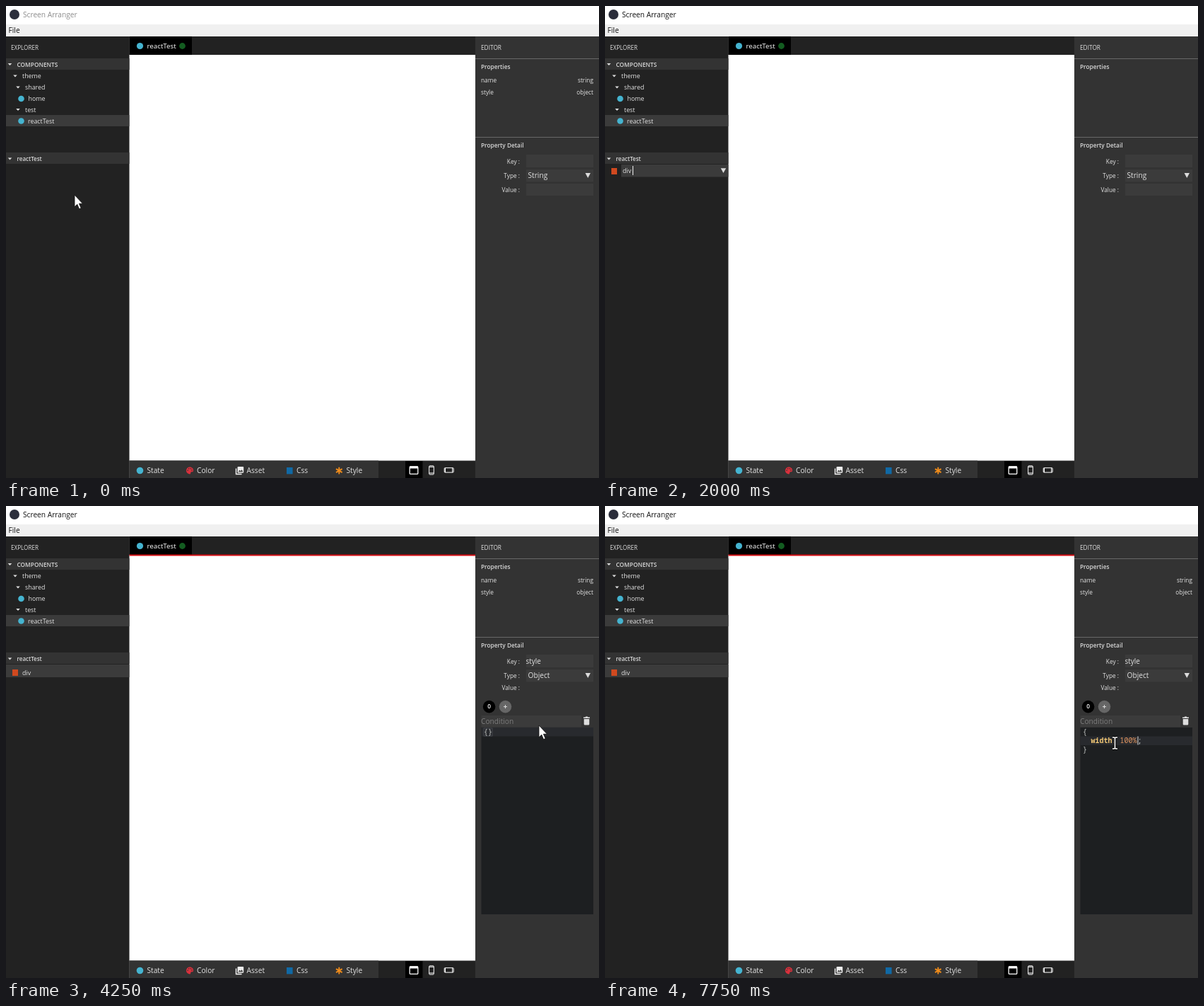
Write an HTML page that moves like this. It is 839 by 667 pixels and loops after 8 s.

```html
<!DOCTYPE html>
<html lang="en">
<head>
<meta charset="utf-8">
<title>Component editor</title>
<style>
  html, body { margin: 0; width: 100%; height: 100%; overflow: hidden; background: #fff; }
  svg { display: block; width: 100%; height: 100%; }
  text { font: 8.9px "Open Sans", "Noto Sans", sans-serif; fill: #e2e2e2; white-space: pre; }
  .big { font-size: 10.2px; }
  .small { font-size: 8.3px; }
  .head { font-size: 8.3px; font-weight: 600; fill: #d8d8d8; }
  .end { text-anchor: end; }
  .mid { text-anchor: middle; }
  .dark { fill: #111; }
  .code { font: 10px "Noto Sans Mono", "DejaVu Sans Mono", monospace; fill: #c5c8c6; }
  .key { font-weight: 600; fill: #f0c674; }
  .num { fill: #de935f; }
  .bar { fill: #333; }
  .field { fill: #3b3b3b; }
  .rule { fill: #686868; }
  .atom { fill: #45b4d0; }
  .markup { fill: #d0491f; }
  .line { fill: none; stroke: #fff; }
</style>
</head>
<body>
<svg viewBox="0 0 839 667" preserveAspectRatio="none">
  <defs>
    <path id="fold" d="M-2.8-1.4H2.8L0 1.6Z" fill="#ddd"/>
    <path id="drop" d="M-3.7-3.3H3.7L0 3.6Z" fill="#ddd"/>
    <path id="arrow" d="M0 0V16.8L3.8 13.3 6.6 19.8 9.2 18.6 6.4 12.3H11.5Z" fill="#fff" stroke="#111" stroke-width=".8"/>
    <g id="hand" stroke="#111" stroke-width=".8">
      <path d="M-2 1.5Q-2-.5 0-.5T2 1.5V8Q4 7 5.5 8.5 7.5 7.8 8.5 9.5 11 9 11 12V17Q11 20 9 22V24H0V22Q-3 18-5.5 14-6 11.5-3.5 12L-2 14Z" fill="#fff"/>
      <path d="M2 8v4M5.3 8.6v3.6M8.4 9.6v3"/>
    </g>
    <g id="beam" fill="none">
      <path id="stem" d="M-3.5-8H-1L0-7 1-8H3.5M0-7V7M-3.5 8H-1L0 7 1 8H3.5" stroke="#000" stroke-width="3.2"/>
      <use href="#stem"/>
      <path d="M-3.5-8H-1L0-7 1-8H3.5M0-7V7M-3.5 8H-1L0 7 1 8H3.5" stroke="#fff" stroke-width="1.6"/>
    </g>
    <path id="resize" d="M-1.8-8V8M1.8-8V8M-4-1.5H-8V-4L-12 0-8 4V1.5H-4ZM4-1.5H8V-4L12 0 8 4V1.5H4Z" fill="#fff" stroke="#dedede" stroke-width=".8"/>
  </defs>

  <!-- Window frame -->
  <rect width="839" height="667" fill="#fff"/>
  <circle cx="12" cy="12" r="7" fill="#2b2e3b"/>
  <text class="big" x="24" y="16" id="title">Screen Arranger</text>
  <rect y="26" width="839" height="17" fill="#f0f0f0"/>
  <text class="big dark" x="3.5" y="37.5">File</text>

  <!-- Explorer -->
  <rect y="43" width="174.5" height="624" fill="#222"/>
  <text class="small" x="7" y="61.5" style="font-size:8.1px">EXPLORER</text>
  <rect class="bar" y="74" width="174.5" height="16"/>
  <use href="#fold" x="5.5" y="82.5"/>
  <text class="head" x="15.5" y="85.5">COMPONENTS</text>
  <use href="#fold" x="13" y="99"/><text x="23" y="102">theme</text>
  <use href="#fold" x="17" y="115"/><text x="27" y="118">shared</text>
  <circle class="atom" cx="21.5" cy="131" r="4.3"/><text x="31.5" y="134">home</text>
  <use href="#fold" x="17" y="146.5"/><text x="27" y="149.5">test</text>
  <rect class="field" y="154" width="174.5" height="16"/>
  <circle class="atom" cx="21.5" cy="162.5" r="4.3"/><text x="31" y="165.5">reactTest</text>
  <rect class="bar" y="207" width="174.5" height="16"/>
  <use href="#fold" x="5.5" y="216"/>
  <text class="head" x="15.5" y="218.5" style="font-size:8px">reactTest</text>

  <g data-at="3-9">
    <rect class="field" x="23" y="224" width="151.5" height="17.5"/>
    <rect class="markup" x="9" y="229" width="8" height="9"/>
    <use href="#drop" x="167.5" y="232.5"/>
    <rect data-at="4-6" x="23" y="225" width="1" height="15.5" fill="#eee"/>
    <g data-at="8-9">
      <text x="25" y="236">div</text>
      <rect x="39" y="226" width="1" height="13" fill="#eee"/>
    </g>
  </g>
  <g data-at="9-32">
    <rect data-at="13-32" class="field" y="224" width="174.5" height="18"/>
    <rect data-at="12-14" y="224" width="174.5" height="18" fill="#484848"/>
    <rect class="markup" x="9" y="231" width="8" height="9"/>
    <text x="23" y="238.5">div</text>
  </g>

  <!-- Tab and canvas -->
  <rect x="174.5" y="43" width="489.5" height="26" fill="#222"/>
  <rect x="174.5" y="43" width="88.5" height="26" fill="#000"/>
  <circle class="atom" cx="189.5" cy="56.5" r="4.6"/>
  <text x="199.5" y="60" style="font-size:9.8px;fill:#fff">reactTest</text>
  <circle id="dot" cx="249.5" cy="56.5" r="4.4"/>
  <rect data-at="13-32" x="174.5" y="68.5" width="489.5" height="2" fill="#d40d12"/>

  <!-- Bottom bar -->
  <rect x="174.5" y="642.5" width="489.5" height="24.5" fill="#222"/>
  <rect class="bar" x="174.5" y="642.5" width="352.5" height="24.5"/>
  <circle class="atom" cx="189.5" cy="656.5" r="4.8"/><text class="big" x="199.5" y="660">State</text>
  <path d="M260 651.5A5 5 0 1 0 260 661.5C262 661.5 260.5 659 262 658.5S265 659 265 656 262.5 651.5 260 651.5Z" fill="#d8303c"/>
  <g class="bar"><circle cx="257.2" cy="656.2" r=".8"/><circle cx="258.7" cy="653.8" r=".8"/><circle cx="261.5" cy="653.8" r=".8"/><circle cx="263" cy="656" r=".8"/></g>
  <text class="big" x="270" y="660">Color</text>
  <path d="M325.5 653.5V661.5H333.5" class="line" stroke-width="1.3"/>
  <rect x="327.5" y="651" width="8.7" height="8.7" rx="1" fill="#eee"/>
  <path d="M328.7 658.3L330.5 655.8 332 657.3 333.5 655.2 335.3 658.3Z" class="bar"/>
  <text class="big" x="340.5" y="660">Asset</text>
  <rect x="397" y="652" width="8.6" height="9.4" fill="#1069a5"/><text class="big" x="411" y="660">Css</text>
  <path d="M471.3 651.7V661.5M467 654.1L475.6 659.1M475.6 654.1L467 659.1" stroke="#f08c1a" stroke-width="1.9"/>
  <text class="big" x="481.5" y="660">Style</text>
  <rect x="565" y="643" width="24.5" height="24" fill="#000"/>
  <rect class="line" x="571.2" y="651" width="11.6" height="10.4" rx="1" stroke-width="1.3"/>
  <rect x="571" y="650.5" width="12" height="3" fill="#fff"/>
  <rect class="line" x="598.7" y="649.8" width="6.6" height="12.2" rx="1" stroke-width="1"/>
  <path class="line" d="M599 651.3H605M599 660H605"/>
  <rect class="line" x="620.2" y="652.7" width="13" height="6.4" rx="1" stroke-width="1"/>
  <path class="line" d="M621.5 653V659M631.7 653V659"/>

  <!-- Editor panel -->
  <rect class="bar" x="664" y="43" width="175" height="624"/>
  <text class="small" x="672" y="61.5">EDITOR</text>
  <rect class="rule" x="664" y="74" width="175" height="1"/>
  <text class="head" x="672" y="89">Properties</text>
  <g data-at="0-2 13-32">
    <rect data-at="16-17" x="664" y="114" width="175" height="16.5" fill="#464646"/>
    <text class="small" x="672" y="108">name</text><text class="small end" x="831" y="108">string</text>
    <text class="small" x="672" y="125">style</text><text class="small end" x="831" y="125">object</text>
  </g>
  <rect class="rule" x="664" y="185" width="175" height="1"/>
  <text class="head" x="672" y="200">Property Detail</text>
  <text class="small end" x="727" y="222.5">Key :</text>
  <text class="small end" x="727" y="243">Type :</text>
  <rect class="field" x="736" y="210" width="95" height="18"/>
  <rect class="field" x="736" y="231" width="95" height="17.5"/>
  <use href="#drop" x="823.3" y="239.3"/>

  <g data-at="0-17">
    <text class="big" x="738.5" y="243">String</text>
    <text class="small end" x="727" y="263">Value :</text>
    <rect class="field" x="736" y="251" width="95" height="17"/>
  </g>
  <g data-at="17-32">
    <text class="big" x="735.5" y="223" style="font-size:9.9px">style</text>
    <text class="big" x="738.5" y="243">Object</text>
    <text class="small end" x="727" y="260">Value :</text>
    <circle cx="683.6" cy="283.6" r="8.8" fill="#000"/>
    <text class="head mid" x="683.6" y="286.4" style="fill:#fff">0</text>
    <circle cx="706.5" cy="283.6" r="8.8" fill="#666"/>
    <path d="M704 283.6H709M706.5 281.1V286.1" stroke="#ddd"/>
    <rect class="field" x="672.5" y="296" width="141.5" height="16.5"/>
    <text class="big" x="672" y="308" style="fill:#7d7d7d">Condition</text>
    <path d="M817 298.5H819.5L820.3 297.5H822.7L823.5 298.5H826V300H817ZM817.7 301H825.3V308.3Q825.3 309.5 824 309.5H819Q817.7 309.5 817.7 308.3Z" fill="#ddd"/>
    <rect x="672.5" y="313" width="158.5" height="264" fill="#1d1f21"/>
    <rect id="row" x="672.5" width="158.5" height="12.5" fill="#282a2e"/>
    <g data-at="17-22">
      <rect x="676" y="314" width="12" height="11" fill="none" stroke="#4b4e55" stroke-width=".8"/>
      <text class="code" x="676" y="323">{}</text>
    </g>
    <g data-at="22-32">
      <text class="code" x="676" y="323">{</text>
      <text class="code" x="687.5" y="335" id="prop"></text>
      <text class="code num" x="728.5" y="335" id="val"></text>
      <text class="code" id="semi" y="335">;</text>
      <text class="code" x="676" y="347.8">}</text>
    </g>
    <rect id="caret" width="1" height="12" fill="#ddd"/>
  </g>

  <use id="cursor"/>
</svg>
<script>
  const LOOP = 8000, STEP = 250, CHAR = 6;
  const $ = id => document.getElementById(id);
  const set = (el, attrs) => {
    for (const name in attrs) el.setAttribute(name, attrs[name]);
  };

  // first step, pointer shape, x, y
  const pointer = [
    [0, "arrow", 97, 267], [1, "arrow", 78, 236], [2, "hand", 70, 213],
    [3, "arrow", 126, 244], [4, "resize", 185, 267], [8, "", 0, 0],
    [11, "arrow", 178, 256], [12, "hand", 156, 236], [14, "arrow", 430, 178],
    [15, "arrow", 742, 150], [16, "hand", 750, 127], [17, "arrow", 754, 310],
    [18, "beam", 741, 326], [19, "beam", 721.5, 335]
  ];

  // text before the caret, one entry per step from TYPE on
  const TYPE = 22;
  const typed = ["", "w", "wid", "width", "width: ", "width: 1", "width: 10", "width: 100", "width: 100%", "width: 100%"];

  const timed = [...document.querySelectorAll("[data-at]")].map(el => ({
    el, spans: el.dataset.at.split(" ").map(s => s.split("-").map(Number))
  }));

  function drawCode(step) {
    const open = step >= TYPE;
    const text = open ? typed[step - TYPE] : "";
    const [prop, value] = text.split(": ");
    const done = value !== undefined;
    $("prop").textContent = done ? prop + ":" : prop;
    $("prop").classList.toggle("key", prop === "width");
    $("val").textContent = value || "";
    set($("semi"), { x: 687.5 + text.length * CHAR, visibility: open && done ? "visible" : "hidden" });
    set($("row"), { y: open ? 325.5 : 313 });
    set($("caret"), {
      x: open ? 687.5 + text.length * CHAR : 682,
      y: open ? 325.5 : 313.5,
      visibility: step >= 20 ? "visible" : "hidden"
    });
  }

  function draw(step) {
    for (const { el, spans } of timed)
      el.style.display = spans.some(([a, b]) => step >= a && step < b) ? "" : "none";
    $("title").style.fill = step < 2 ? "#8c8c8c" : "#111";
    $("dot").style.fill = step >= TYPE && step < 31 ? "#7c1622" : "#135c20";
    const [, shape, x, y] = pointer.filter(p => p[0] <= step).pop();
    set($("cursor"), { href: "#" + shape, x, y });
    drawCode(step);
  }

  const start = performance.now();
  let last = -1;
  function tick() {
    const step = Math.floor((performance.now() - start) % LOOP / STEP);
    if (step !== last) draw(last = step);
    requestAnimationFrame(tick);
  }
  tick();
</script>
</body>
</html>
```
